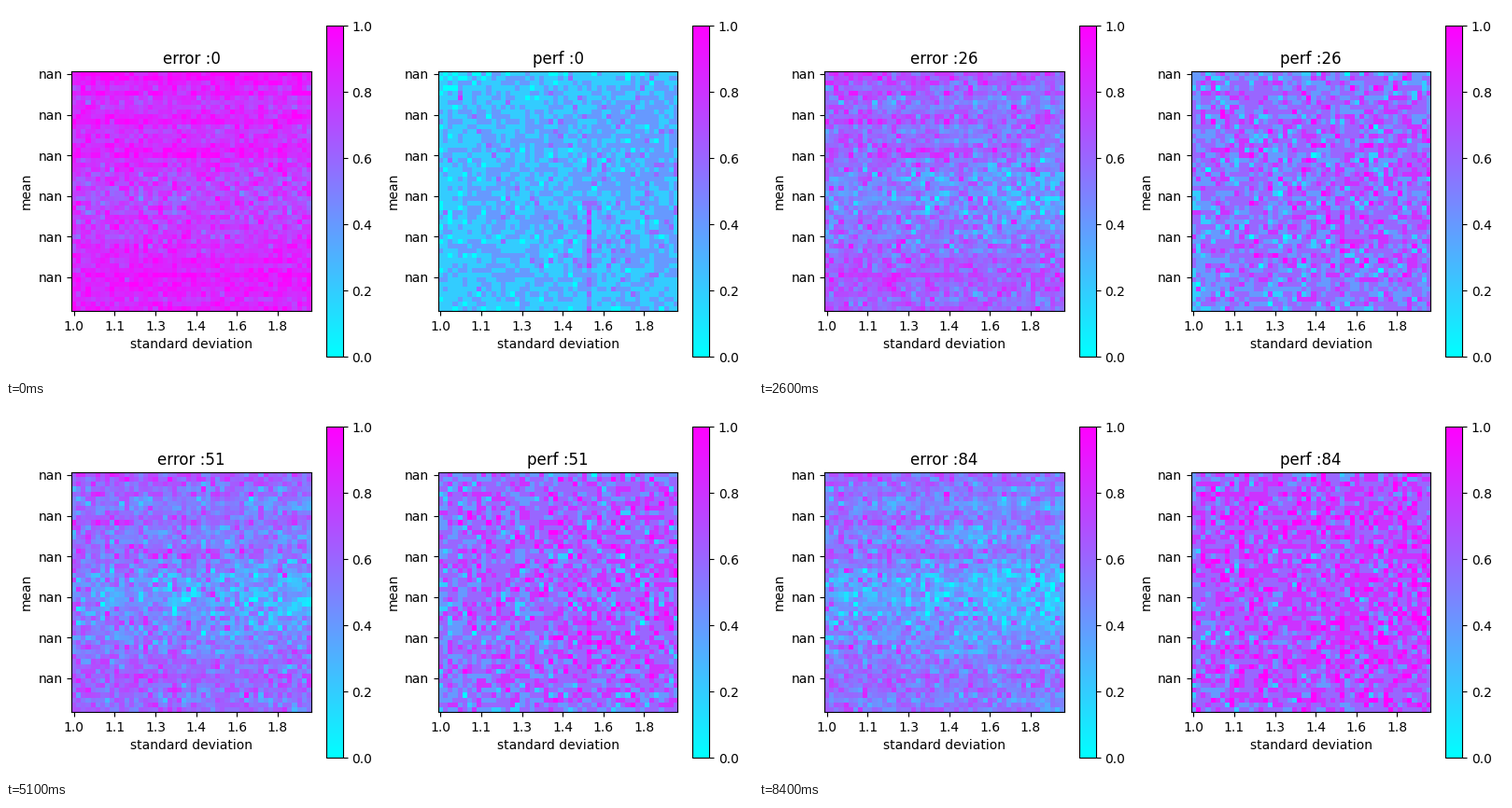
A matplotlib script that plays this animation: 800x400 px, repeating every 8.5 s.

```python
import numpy as np
import matplotlib.pyplot as plt
from matplotlib.animation import FuncAnimation

W, H = 800, 400
N = 50
FRAMES = 85

plt.rcParams["font.family"] = "DejaVu Sans"
fig = plt.figure(figsize=(8, 4), dpi=100)

rng = np.random.default_rng(12)
row, col = np.mgrid[0:N, 0:N]

# Error: horizontal stripes plus a valley that deepens to the right.
stripes = rng.normal(0, 0.03, N)
for r, bump in {0: .06, 1: .05, 10: .1, 16: .06, 17: .07, 42: .04,
                3: -.04, 6: -.05, 11: -.05, 13: -.03, 34: -.04}.items():
    stripes[r] += bump
valley = np.exp(-((row - 25) / 7.5) ** 2)
edges = 0.04 * (row > 40) + 0.03 * (row < 3)
err_noise = rng.normal(size=(N, N))

# Perf: weaker at the top, bottom and left, with one strong column.
perf_shape = (0.03 - 0.09 * np.exp(-row / 3.0) - 0.1 * np.exp((row - 49) / 4.0)
              - 0.06 * np.exp(-col / 6.0) + 0.04 * (col / 49 - 0.5))
streak = ((col == 31) & ((row > 26) | (abs(row - 19) < 2))).astype(float)
streak += (col == 4) & (row > 3) & (row < 7)
perf_noise = rng.normal(size=(N, N))


def mix(base, k, seed):
    fresh = np.random.default_rng(seed + k).normal(size=(N, N))
    return 0.8 * base + 0.6 * fresh


def error_field(k):
    learned, t = 1 - np.exp(-k / 2), k / (FRAMES - 1)
    level = 0.83 - 0.2 * learned - 0.13 * t
    dip = valley * (0.11 + 0.09 * learned * col / 49)
    spread = 0.075 + 0.045 * learned + 0.04 * valley
    slope = 0.06 * learned * (0.5 - col / 49)
    field = (level + stripes[:, None] + edges - dip + slope
             + spread * mix(err_noise, k, 1000))
    return np.clip(field, 0, 1)


def perf_field(k):
    learned, t = 1 - np.exp(-k / 2), k / (FRAMES - 1)
    level = 0.29 + 0.23 * learned + 0.16 * t ** 1.6
    spread = 0.11 + 0.06 * learned
    field = (level + perf_shape + streak * (0.3 - 0.2 * learned)
             + spread * mix(perf_noise, k, 5000))
    return np.clip(np.round(field * 5) / 5, 0, 1)


def box(x, y, w, h):
    return fig.add_axes([x / W, 1 - (y + h) / H, w / W, h / H])


def panel(x):
    ax = box(x, 70.4, 256.5, 256.5)
    im = ax.imshow(np.zeros((N, N)), cmap="cool", vmin=0, vmax=1,
                   interpolation="nearest", aspect="auto")
    ticks = np.arange(6) * 8.5
    ax.set_xticks(ticks, ["1.0", "1.1", "1.3", "1.4", "1.6", "1.8"])
    ax.set_yticks(ticks, ["nan"] * 6)
    ax.set_xlabel("standard deviation")
    ax.set_ylabel("mean")
    fig.colorbar(im, cax=box(x + 272.6, 21.1, 17.8, 355.3))
    return im, ax.set_title("")


err_im, err_title = panel(70.3)
perf_im, perf_title = panel(462.8)


def draw(k):
    err_im.set_data(error_field(k))
    perf_im.set_data(perf_field(k))
    err_title.set_text(f"error :{k}")
    perf_title.set_text(f"perf :{k}")
    return err_im, perf_im, err_title, perf_title


anim = FuncAnimation(fig, draw, frames=FRAMES, interval=100,
                     init_func=lambda: draw(0), repeat=True, repeat_delay=0)
plt.show()
```
